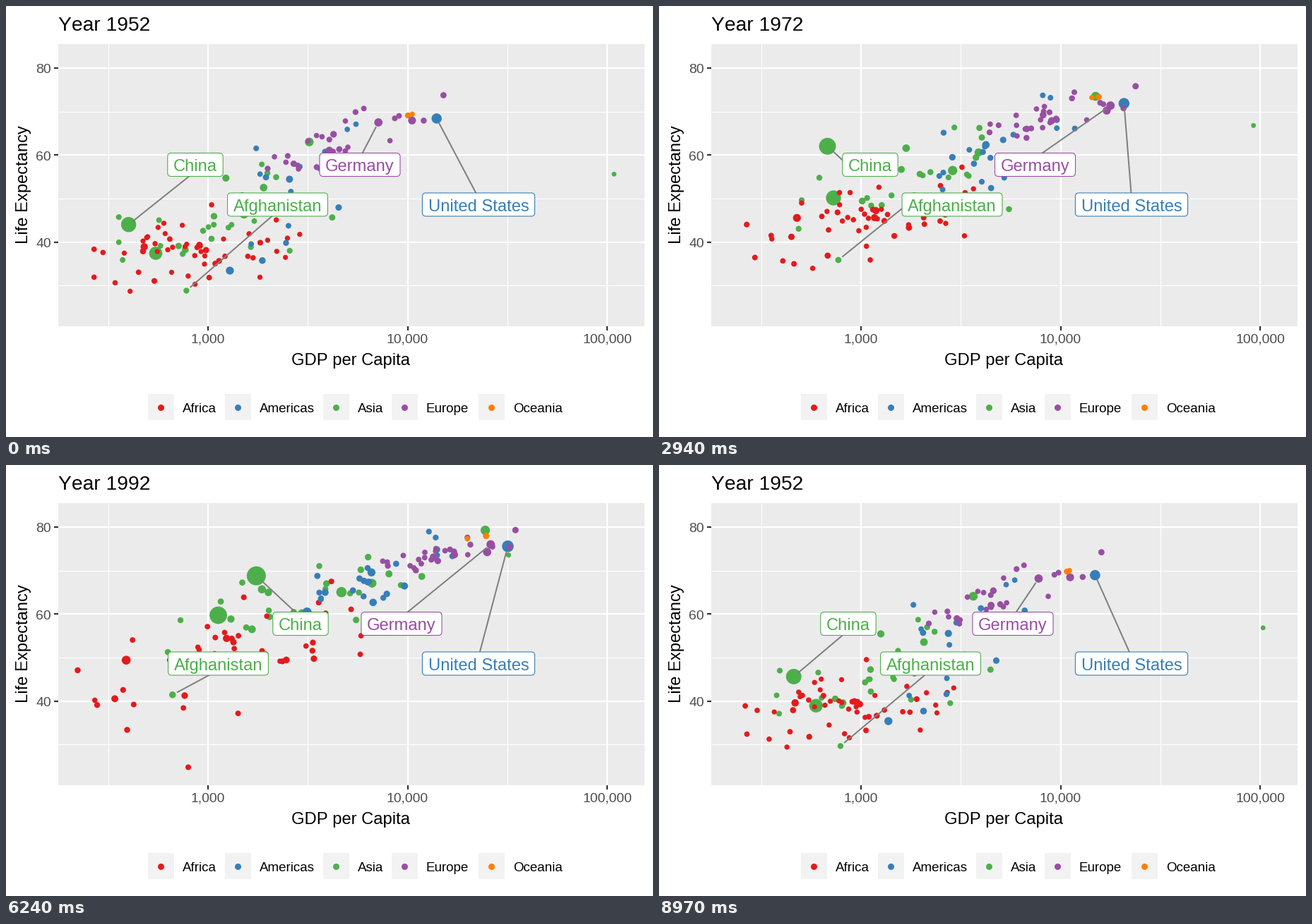
A matplotlib script for the animation above (9000 ms loop, 916 by 611 pixels).

```python
import matplotlib.pyplot as plt
import numpy as np
from matplotlib.animation import FuncAnimation
from matplotlib.patches import FancyBboxPatch, Rectangle

W, H, DPI = 916, 611, 100
PT = 72 / DPI
STATES, STEP = 12, 25
HUES = {"Africa": "#E41A1C", "Americas": "#377EB8", "Asia": "#4DAF4A",
        "Europe": "#984EA3", "Oceania": "#FF7F00"}

rng = np.random.default_rng(7)
u = np.linspace(0, 1, STATES)[:, None]
plt.rcParams["font.family"] = "Liberation Sans"
plt.rcParams["text.kerning_factor"] = 6


# ---- data: log GDP, life expectancy and population of every dot ----
layers = []


def path(keys, bend=1):
    """Curve through evenly spaced key values, one value per state."""
    return np.interp(u ** bend, np.linspace(0, 1, len(keys)), keys)


def add(hue, log, life, pop):
    layers.append((log, life, pop, [HUES[hue]] * log.shape[1]))


def track(hue, pop, gdp, life, bends=(1, 1)):
    """One country with its own course."""
    add(hue, path(np.log10(gdp), bends[0]), path(life, bends[1]),
        10 ** path(np.log10(pop)))


def scores(n, turn):
    """Standard scores that slowly turn from one draw towards another."""
    a, b = np.clip(rng.normal(size=(2, n)), -1.9, 2)
    return a * np.cos(turn * u) + b * np.sin(turn * u)


def cloud(hue, n, wealth, spread, life, dev, link, top, rise):
    """A continent whose life expectancy is correlated with its wealth."""
    rich, health = scores(n, .6), scores(n, .9)
    link = path(link)
    mixed = link * rich + np.sqrt(1 - link ** 2) * health
    add(hue, path(wealth) + path(spread) * rich,
        path(life) + path(dev) * mixed,
        top / np.arange(1, n + 1) ** .87 * rise ** u)


# China, Afghanistan, Germany, United States
track("Asia", (556, 1318), (400, 500, 660, 844, 1420, 2400, 4959),
      (44, 45.5, 62.3, 64.7, 67.6, 70.6, 73))
track("Asia", (8.4, 32), (779, 850, 745, 882, 680, 640, 975),
      (28.8, 31.7, 35.4, 39.1, 41.1, 41.9, 43.8))
track("Europe", (69, 82), (7144, 32170), (67.5, 79.4), (.48, 1.08))
track("Americas", (158, 301), (13990, 42952), (68.4, 78.2))
# India, Japan, Kuwait, Rwanda
track("Asia", (372, 1110), (547, 650, 712, 834, 1010, 1330, 2452),
      (37.4, 55.4, 64.7))
track("Asia", (86, 127), (3217, 31656), (63, 82.6), (.38, .6))
track("Asia", (.2, 2.5), (108382, 97000, 108000, 43000, 29500, 36500, 47307),
      (55.6, 77.6), (1, .65))
crisis = np.exp(-((np.arange(STATES) - 8) / .6) ** 2)
track("Africa", (2.5, 8.9), (493, 863), 41 + 5 * u[:, 0] - 21 * crisis,
      (.5, 1))

cloud("Asia", 28, (3.18, 3.58, 3.79), (.33, .43, .48), (46.8, 61.5, 71),
      (8, 8, 6.5), (.6, .75, .85), 82, 2.6)
cloud("Africa", 51, (2.98, 3.16, 3.21), (.29, .34, .43), (39.2, 50, 54.8),
      (4.8, 6.5, 9), (.3, .5, .55), 36, 3.6)
cloud("Americas", 24, (3.46, 3.73, 3.91), (.22, .22, .26), (53, 64.5, 73.5),
      (8.5, 6, 3.8), (.6, .65, .75), 57, 2.5)
cloud("Europe", 29, (3.7, 4.12, 4.36), (.24, .2, .22), (64.5, 72.2, 77.7),
      (4.8, 2.4, 2.4), (.85, .7, .85), 55, 1.3)
track("Oceania", (8.7, 20), (10040, 34435), (69.1, 81.2))
track("Oceania", (2, 4), (10557, 25185), (69.4, 80.2))


def px(log_gdp):
    return 286 + 282.5 * (log_gdp - 3)


def py(life):
    return 334.5 - 6.163 * (life - 40)


logs, lives, pops, tints = zip(*layers)
X = px(np.hstack(logs))
Y = py(np.hstack(lives))
DIAM = 6.5 + 23 * np.sqrt(np.hstack(pops) / 1318)
colors = sum(tints, [])

# ---- static chart ----
fig = plt.figure(figsize=(W / DPI, H / DPI), dpi=DPI, facecolor="white")
ax = fig.add_axes([0, 0, 1, 1])
ax.set(xlim=(0, W), ylim=(H, 0))
ax.axis("off")

L, R, T, B = 74, 904, 53.5, 453.5


def rect(x, y, w, h, fill):
    ax.add_patch(Rectangle((x, y), w, h, fc=fill, lw=0, zorder=0))


def stroke(xs, ys, color, width):
    ax.plot(xs, ys, color=color, lw=width * PT, zorder=1,
            solid_capstyle="butt")


def write(x, y, s, size, color="black", **kw):
    return ax.text(x, y, s, fontsize=size * PT, color=color, **kw)


rect(L, T, R - L, B - T, "#EBEBEB")
for k in (2.5, 3.5, 4.5):
    stroke([px(k)] * 2, [T, B], "white", 1.1)
for k in (30, 50, 70):
    stroke([L, R], [py(k)] * 2, "white", 1.1)
for k in (3, 4, 5):
    stroke([px(k)] * 2, [T, B], "white", 2.2)
    stroke([px(k)] * 2, [B, B + 6], "#333333", 2.2)
    write(px(k), 478, f"{10 ** k:,}", 19.4, "#4D4D4D", ha="center")
for k in (40, 60, 80):
    stroke([L, R], [py(k)] * 2, "white", 2.2)
    stroke([L - 6, L], [py(k)] * 2, "#333333", 2.2)
    write(64, py(k) + 7.3, k, 19.4, "#4D4D4D", ha="right")
title = write(74, 35, "", 28.2)
write(488.5, 509, "GDP per Capita", 23.7, ha="center")
write(31, 253.5, "Life Expectancy", 23.7, rotation=90, ha="center",
      rotation_mode="anchor")
for (name, hue), x in zip(HUES.items(), (201, 310, 449, 546, 669)):
    rect(x, 550, 37, 37, "#F2F2F2")
    ax.scatter(x + 18.3, 568.6, s=(9 * PT) ** 2, c=hue, lw=0)
    write(x + 49, 576.3, name, 18.8)

# ---- moving parts ----
dots = ax.scatter(X[0], Y[0], s=1, c=colors, lw=0, zorder=2)
LABEL_AT = (0, 46, 98, 141, 208, 268, 299)
ROWS = (225, 281.5)
BOX_H = 33
INSET = 7


class Label:
    def __init__(self, i, name, centers):
        self.i, self.centers = i, centers
        self.text = write(0, 0, name, 23.7, colors[i], ha="center", zorder=5)
        size = self.text.get_window_extent(fig.canvas.get_renderer())
        self.half = size.width / 2 + 8.2
        self.box = FancyBboxPatch(
            (0, 0), 2 * self.half - 8, BOX_H - 8, fc="white", ec=colors[i],
            boxstyle="round,pad=4,rounding_size=5", lw=1.1 * PT, zorder=4)
        ax.add_patch(self.box)
        self.line, = ax.plot([], [], color="#7F7F7F", lw=2 * PT, zorder=3)

    def place(self, n, row, x, y):
        cx, cy = np.interp(n, LABEL_AT, self.centers), ROWS[row]
        self.text.set_position((cx, cy + 9.3))
        self.box.set_x(cx - self.half + 4)
        self.box.set_y(cy - BOX_H / 2 + 4)
        # Join the side midpoint if the dot lies mostly beside the box
        side, rise = np.sign(x - cx), np.sign(y - cy)
        if abs(x - cx) - self.half > abs(y - cy) - BOX_H / 2:
            end = np.array([cx + side * (self.half - INSET), cy])
        else:
            end = np.array([cx, cy + rise * (BOX_H / 2 - INSET)])
        dot = np.array([x, y])
        gap = end - dot
        dot = dot + gap * min(1, 8 / max(np.hypot(*gap), 1e-6))
        self.line.set_data([dot[0], end[0]], [dot[1], end[1]])


labels = [
    Label(0, "China", (268, 268, 299, 268, 417, 435.5, 268)),
    Label(1, "Afghanistan", (384.5, 387, 415, 390, 300.5, 319, 384.5)),
    Label(2, "Germany", (501, 503, 532.5, 552, 560, 552, 501)),
    Label(3, "United States", (669,) * 7),
]


def update(n):
    k, j = divmod(n, STEP)
    hold = 7 if k else 6
    t = max(0, j - hold) / (STEP - hold)
    nxt = (k + 1) % STATES
    x, y, d = (a[k] + (a[nxt] - a[k]) * t for a in (X, Y, DIAM))
    dots.set_offsets(np.column_stack([x, y]))
    dots.set_sizes((d * PT) ** 2)
    title.set_text(f"Year {1952 + 5 * (nxt if t > .5 else k)}")
    swapped = 117 <= n < 175 or 240 <= n < 287
    for label, row in zip(labels, (0, 1, int(swapped), int(not swapped))):
        label.place(n, row, x[label.i], y[label.i])


anim = FuncAnimation(fig, update, frames=STATES * STEP, interval=30,
                     repeat=True, repeat_delay=0, cache_frame_data=False)
plt.show()
```
